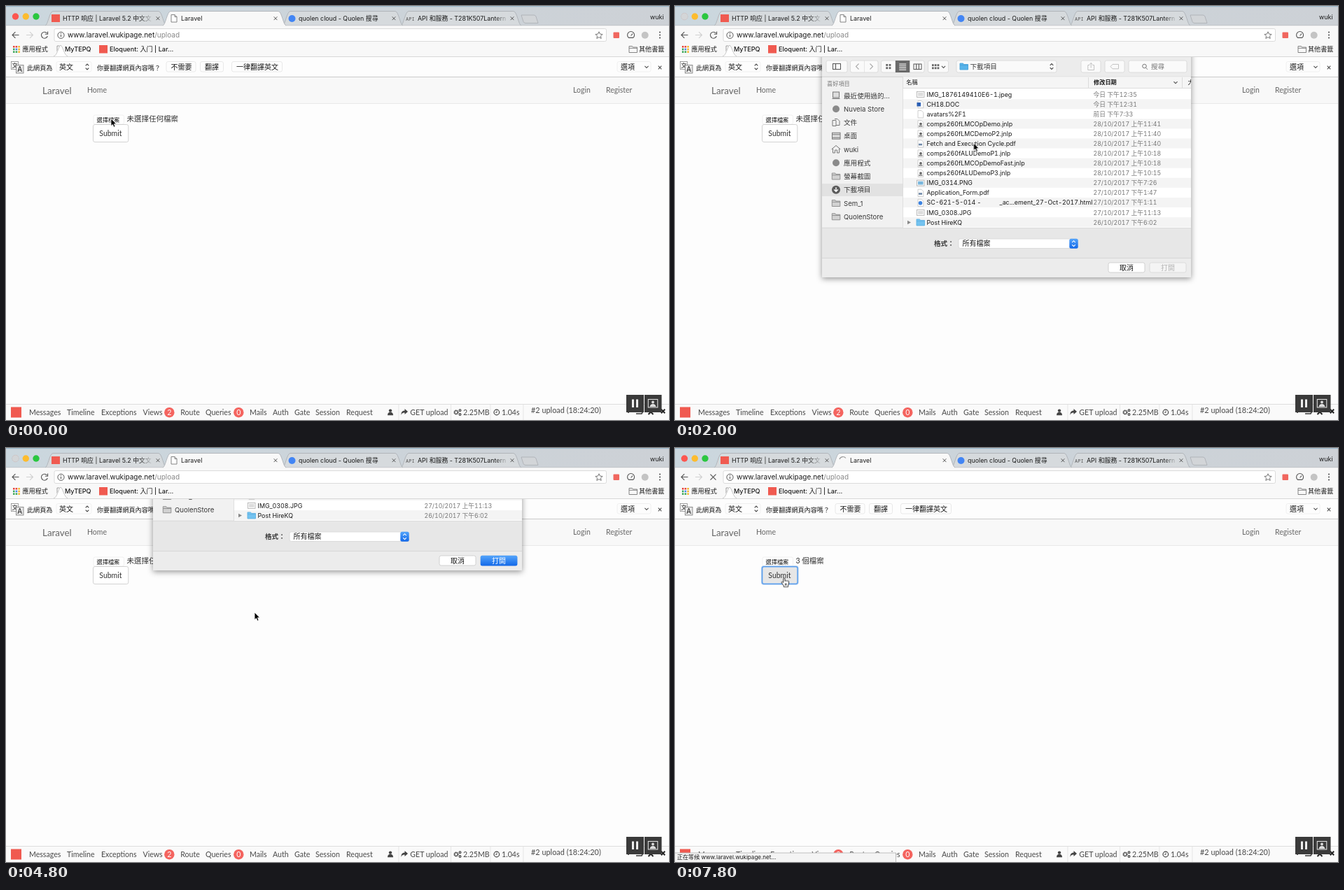
Recreate the animation shown at these times as an HTML page. Size 947x592 px, loop 8000 ms.

```html
<!DOCTYPE html>
<html lang="zh-Hant">
<head>
<meta charset="utf-8">
<title>Upload</title>
<style>
html, body { margin: 0; width: 100%; height: 100%; overflow: hidden; background: #fdfdfd; }
svg { display: block; width: 947px; height: 592px; }
text { font: 8.9px Inter, "Noto Sans CJK TC", "Noto Sans CJK", sans-serif; fill: #1a1a1a; white-space: pre; }
.url { font-size: 10px; }
.ui { font-size: 10px; }
.side { font-size: 9.6px; fill: #383838; }
.small { font-size: 8.2px; }
.status { font-size: 8.05px; }
.mark { font-size: 9.1px; font-weight: 500; }
.semi { font-weight: 500; }
.bold { font-weight: 600; }
.name, .date { font-variant-numeric: tabular-nums; }
.date { font-size: 8.75px; fill: #777; }
.page { font: 10.5px Lato, "Noto Sans CJK TC", "Noto Sans CJK", sans-serif; fill: #666; }
.brand { font-size: 13.4px; }
.bar { font-size: 10.6px; fill: #484848; }
.request { font-size: 10.9px; }
.dark { fill: #333; }
.gray { fill: #777; }
.pale { fill: #b4b4b4; }
.white { fill: #fff; }
.line { fill: none; stroke: #555; stroke-width: 1.1; }

.sheet, .cursor, .t { animation: 8s step-end infinite; }
.sheet { animation-name: sheet; }
.cursor { animation-name: cursor; }
.modal { animation-name: modal; }
.loaded { animation-name: loaded; }
.picked { animation-name: picked; }
.range { animation-name: range; }
.before { animation-name: before; }
.after { animation-name: after; }
.point { animation-name: point; }
.hover { animation-name: hover; }
.focus { animation-name: focus; }
.idle { animation-name: idle; }
.loading { animation-name: loading; }
.waiting { animation-name: waiting; }
.spin { transform-origin: 240px 18px; animation: spin 1.6s steps(8) infinite; }

@keyframes sheet {
  0%, 62.5%, 100% { transform: translateY(-335px); }
  12.5% { transform: translateY(-182px); }
  15%, 57.5% { transform: none; }
  60% { transform: translateY(-213px); }
}
@keyframes cursor {
  0% { transform: translate(150px, 161px); }
  17.5% { transform: translate(150px, 161px); animation-timing-function: steps(3); }
  25% { transform: translate(426.5px, 196px); }
  32.5% { transform: translate(426.5px, 196px); animation-timing-function: steps(2); }
  37.5% { transform: translate(424px, 168px); }
  45% { transform: translate(424px, 168px); animation-timing-function: steps(3); }
  52.5% { transform: translate(689px, 370px); }
  57.5% { transform: translate(600px, 334px); }
  60% { transform: translate(355px, 235px); }
  62.5% { transform: translate(200px, 196px); }
  65% { transform: translate(157px, 185px); }
  85%, 100% { transform: translate(156px, 185.5px); }
}
@keyframes modal { 0%, 62.5%, 100% { opacity: 0; } 12.5% { opacity: 1; } }
@keyframes loaded { 0% { opacity: 0; } 17.5%, 100% { opacity: 1; } }
@keyframes picked { 0% { opacity: 0; } 30%, 100% { opacity: 1; } }
@keyframes range { 0% { opacity: 0; } 37.5%, 100% { opacity: 1; } }
@keyframes before { 0% { opacity: 1; } 62.5%, 100% { opacity: 0; } }
@keyframes after { 0% { opacity: 0; } 62.5%, 100% { opacity: 1; } }
@keyframes point { 0% { opacity: 1; } 65%, 100% { opacity: 0; } }
@keyframes hover { 0% { opacity: 0; } 65%, 100% { opacity: 1; } }
@keyframes focus { 0% { opacity: 0; } 85%, 100% { opacity: 1; } }
@keyframes idle { 0% { opacity: 1; } 90%, 100% { opacity: 0; } }
@keyframes loading { 0% { opacity: 0; } 90%, 100% { opacity: 1; } }
@keyframes waiting { 0% { opacity: 0; } 92.5%, 100% { opacity: 1; } }
@keyframes spin { from { transform: rotate(-45deg); } to { transform: rotate(-405deg); } }
</style>
</head>
<body>
<svg id="stage" viewBox="0 0 947 592"></svg>
<script>
const text = (x, y, s, cls = '') => `<text x="${x}" y="${y}" class="${cls}">${s}</text>`;
const rect = (x, y, w, h, fill, more = '') => `<rect x="${x}" y="${y}" width="${w}" height="${h}" fill="${fill}" ${more}/>`;
const circle = (x, y, r, fill, more = '') => `<circle cx="${x}" cy="${y}" r="${r}" fill="${fill}" ${more}/>`;
const path = (d, more = 'class="line"') => `<path d="${d}" ${more}/>`;
const stroke = (color, width = 1) => `fill="none" stroke="${color}" stroke-width="${width}"`;
const group = (cls, ...parts) => `<g class="${cls}">${parts.join('')}</g>`;
const each = (list, fn) => list.map(fn).join('');
const cross = (x, y, r, more) => path(`M${x - r} ${y - r}l${2 * r} ${2 * r}m0 ${-2 * r}l${-2 * r} ${2 * r}`, more);
const button = (x, y, w, h, fill = '#fff', edge = '#d6d6d6') => rect(x, y, w, h, fill, `rx="2.5" stroke="${edge}" stroke-width=".8"`);
const updown = (x, y, color = '#444') => path(`M${x - 2.3} ${y - 1.6}l2.3-2.4 2.3 2.4m-4.6 3.2l2.3 2.4 2.3-2.4`, stroke(color, 1.1));
const down = (x, y) => path(`M${x - 2.6} ${y - 1.2}l2.6 2.6 2.6-2.6`);
const folder = (x, y, fill, edge) => path(`M${x} ${y}h4.5l1 1.5h6v7.5h-11.5zM${x} ${y + 2.8}h11.5`, `fill="${fill}" stroke="${edge}" stroke-width=".9"`);
const sheetIcon = (x, y) => path(`M${x} ${y}h5l3 3v7.5h-8zM${x + 5} ${y}v3h3`, 'fill="#fff" stroke="#777" stroke-width=".9"');

const RED = '#f05a50';

const tab = (a, b, fill) => path(
  `M${a} 28C${a + 4} 27 ${a + 6} 8 ${a + 11} 7.5H${b - 11}C${b - 6} 8 ${b - 4} 27 ${b} 28`,
  `fill="${fill}" stroke="#a9adb1" stroke-width=".8"`);

function tabStrip() {
  return rect(0, 0, 947, 28, 'url(#strip)') + rect(0, 0, 947, 1.2, '#9db9cb')
    + circle(13.5, 15, 4.7, '#fc5650') + `<circle cx="13.5" cy="15" r="4.9" fill="#d3d5d7" stroke="#c3c5c7" stroke-width=".5" class="t modal"/>`
    + circle(28.3, 15, 4.7, '#fdbc2e') + circle(43, 15, 4.7, '#2ac73f')
    + tab(564, 736, '#d6dadd') + tab(395, 567, '#d6dadd') + tab(56, 229, '#d6dadd')
    + path('M736 13h18q2 0 3 2l3 9.5h-18q-2 0-3-2z', 'fill="#d2d5d8" stroke="#a9adb1" stroke-width=".8"')
    + rect(0, 27.6, 947, .8, '#b4b6b8')
    + tab(224, 400, '#f8f8f8') + rect(225, 27.5, 174, 1.5, '#f8f8f8')
    + rect(65, 12, 12, 11, RED) + text(81, 20.5, 'HTTP 响应 | Laravel 5.2 中文文')
    + rect(190, 10, 20, 14, 'url(#fade)')
    + group('t idle', sheetIcon(236, 12.5))
    + group('t loading', path('M235 16A5.2 5.2 0 0 1 244 14.5', 'class="spin" ' + stroke('#999', 1.2)))
    + text(250, 20.5, 'Laravel')
    + circle(408.5, 18, 5, '#4285f4') + text(418, 20.5, 'quolen cloud - Quolen 搜尋')
    + `<text x="571" y="20.5" style="font:7px 'Noto Sans Mono',monospace;fill:#555">API</text>`
    + text(588, 20.5, 'API 和服務 - T281K507Lantern') + rect(698, 10, 20, 14, 'url(#fade)')
    + each([217, 385, 554, 723], x => cross(x, 17.7, 2.4, stroke('#555', 1)))
    + text(920, 18.5, 'wuki');
}

function toolbar() {
  return rect(0, 28.4, 947, 44, '#f8f8f8') + rect(69, 32.5, 788.5, 18, '#fff', 'rx="2" stroke="#d3d3d3" stroke-width=".8"')
    + path('M18.5 41.5H9m4.4-4.4L9 41.5l4.4 4.4')
    + path('M29 41.5h9.5m-4.4-4.4l4.4 4.4-4.4 4.4', stroke('#d0d0d0', 1.1))
    + group('t idle', path('M58.6 39A4.5 4.5 0 1 0 59.3 43M59.6 36.5v3.7h-3.7'))
    + group('t loading', cross(54.5, 41.7, 4, stroke('#555', 1.2)))
    + circle(78.5, 41.8, 4.6, 'none', 'stroke="#555"') + path('M78.5 41v3.2M78.5 38.8v1.2')
    + `<text x="88" y="45.2" class="url">www.laravel.wukipage.net<tspan fill="#888">/upload</tspan></text>`
    + path('M847 36.8l1.5 3.3 3.6.4-2.7 2.4.8 3.5-3.2-1.8-3.2 1.8.8-3.5-2.7-2.4 3.6-.4z', stroke('#666', .9))
    + rect(867.5, 37.5, 8.5, 8.5, '#f0675f', 'rx="1"')
    + path('M889.4 45.4a5 5 0 1 1 6.4 0zM892.6 42.5l2.4-2.8') + circle(912.7, 41.8, 5, '#c4c4c4')
    + each([37.5, 41.5, 45.5], y => circle(934, y, 1.1, '#555'))
    + each([0, 1, 2, 3, 4, 5, 6, 7, 8], i => rect(10 + i % 3 * 3.7, 57 + (i / 3 | 0) * 3.7, 2.5, 2.5,
        ['#e8453c', '#e8453c', '#f5b52a', '#3aa757', '#4285f4', '#f5b52a', '#3aa757', '#3aa757', '#f5b52a'][i]))
    + text(23.5, 65.2, '應用程式', 'mark')
    + path('M73 65V57h3.5', stroke('#888', .8))
    + path('M68 72.6L78 56 88.5 72.6z', 'fill="#fff"') + path('M68 72C73 71 75 58 78 56M78 56C81 57 83 70 88 72', stroke('#b5b5b5', .8))
    + text(84, 65.2, 'MyTEPQ', 'mark')
    + rect(133, 56, 12, 11.5, RED) + text(148, 65.2, 'Eloquent: 入门 | Lar...', 'mark')
    + folder(890, 57.5, '#f8f8f8', '#777') + text(904, 65.2, '其他書籤', 'mark')
    + rect(0, 72.3, 947, .9, '#c9c9c9');
}

function infoBar() {
  return rect(0, 73, 947, 28.5, '#fdfdfd') + rect(0, 101, 947, 1, '#cacaca')
    + rect(7.5, 79.5, 10, 11, '#fff', 'stroke="#888" stroke-width=".8"') + text(8.4, 88.3, '文', 'small')
    + rect(14.5, 84.5, 10.5, 11.5, '#e8e8e8', 'stroke="#777" stroke-width=".8"') + text(16.3, 94, 'A', 'ui')
    + text(30, 91.7, '此網頁為', 'mark') + button(72, 79.5, 50, 14.5, '#fdfdfd', '#ececec') + text(76, 90.6, '英文', 'ui') + updown(116, 87)
    + text(130, 91.7, '你要翻譯網頁內容嗎？', 'mark')
    + each([[229, 42, '不需要'], [277.5, 33, '翻譯'], [322.5, 72, '一律翻譯英文']], ([x, w, s]) =>
        button(x, 79.5, w, 14.5, '#fdfdfd', '#e4e4e4') + text(x + 6.4, 90.6, s, 'ui'))
    + button(873, 79.5, 48, 14.5, '#fdfdfd', '#ececec') + text(878, 90.6, '選項', 'ui') + down(915, 87)
    + cross(934, 88, 2.3, stroke('#555', 1.2));
}

function page() {
  return rect(0, 102, 947, 37.3, '#f8f8f8') + rect(0, 139, 947, .9, '#e7e7e7')
    + text(52, 125.6, 'Laravel', 'page brand')
    + each([[116, 'Home'], [810, 'Login'], [857, 'Register']], ([x, s]) => text(x, 124.3, s, 'page'))
    + button(125, 156, 43.5, 13, '#fff', '#ececec') + text(129.5, 166, '選擇檔案', 'small semi')
    + group('t before', text(172.5, 164.6, '未選擇任何檔案', 'page dark'))
    + group('t after', text(172.5, 164.6, '3 個檔案', 'page dark'))
    + button(124.5, 169.5, 50.3, 25, '#fff', '#c8c8c8')
    + group('t hover', button(124.5, 169.5, 50.3, 25, '#e6e6e6', '#adadad'))
    + group('t focus', rect(124.3, 169.5, 51, 25, '#e6e6e6', 'rx="2.5" stroke="#b3d0f3" stroke-width="2.6"'),
        rect(124.5, 169.7, 50.6, 24.6, 'none', 'rx="2.5" stroke="#5a9ce8" stroke-width="1.3"'))
    + text(133.3, 185.8, 'Submit', 'page dark');
}

function debugBar() {
  const items = [[33, 'Messages'], [87, 'Timeline'], [136, 'Exceptions'], [195.5, 'Views'], [249.3, 'Route'], [285, 'Queries'],
    [348, 'Mails'], [381, 'Auth'], [412, 'Gate'], [442, 'Session'], [486, 'Request'], [577.3, 'GET upload'], [653, '2.25MB'], [708, '1.04s']];
  return rect(0, 569.5, 947, 22.5, '#fafafa') + rect(0, 569, 947, 1, '#dedede')
    + rect(7, 573.5, 15, 15, RED)
    + each(items, ([x, s]) => text(x, 584.7, s, 'page bar'))
    + each([[233.3, 2], [332.3, 0]], ([x, n]) => circle(x, 581.2, 7.2, '#f4645f') + text(x - 3, 584.8, n, 'page bar white'))
    + circle(549, 578.6, 2.2, '#444') + path('M545 585.3q0-4.5 4-4.5t4 4.5z', 'fill="#444"')
    + path('M564.5 585q-.5-6.5 5-6.5v-2.4l4.5 4-4.5 4v-2.5q-4-.2-5 3.4z', 'fill="#444"')
    + circle(643, 581, 2.5, 'none', 'stroke="#444" stroke-width="2" stroke-dasharray="1.5 .5"')
    + each([578.3, 584], y => circle(648.5, y, 1.4, 'none', 'stroke="#444" stroke-width="1.2"'))
    + circle(700.8, 581, 3.8, 'none', 'stroke="#444" stroke-width="1.2"') + path('M701 578.7v2.7h-1.8', stroke('#444', .9))
    + each([560.5, 635, 691.5, 738.5], x => rect(x, 570, .8, 22, '#e2e2e2'))
    + text(750, 582, '#2 upload (18:24:20)', 'page bar request')
    + path('M886 578h3v4M900 583h8l2-4', stroke('#333', 1.6))
    + path('M917.5 584l3.5-3.5 3.5 3.5', stroke('#222', 2)) + cross(938.5, 579.5, 2.7, stroke('#222', 2))
    + group('t waiting', rect(-1, 579, 316.5, 14, '#f4f4f4', 'stroke="#b8b8b8" stroke-width=".9"'),
        text(3, 588.3, '正在等候 www.laravel.wukipage.net...', 'status'));
}

const playerButtons = () => rect(886, 556, 25, 25, '#3a3a3a') + rect(912, 556, 24.5, 25, '#3a3a3a')
  + rect(894, 562.5, 3, 11.5, '#eee') + rect(900, 562.5, 3, 11.5, '#eee')
  + rect(917.3, 562.5, 13.5, 11.5, 'none', 'stroke="#ddd" stroke-width="1.1"')
  + circle(924, 566.5, 1.9, '#ddd') + path('M919.5 573q1-4 4.5-4t4.5 4z', 'fill="#ddd"');

const places = ['最近使用過的...', 'Nuvela Store', '文件', '桌面', 'wuki', '應用程式', '螢幕截圖', '下載項目', 'Sem_1', 'QuolenStore'];

function placeIcon(i, y) {
  const gray = stroke('#777', 1);
  switch (i) {
    case 0: return rect(225.5, y - 5, 9, 8, '#ddd', 'stroke="#777"') + path(`M224.5 ${y + 4.5}h11`, gray);
    case 1: case 5: return circle(230, y, 5, '#8a8a8a');
    case 2: return path(`M225 ${y - 3}h5v8h-5zM228 ${y - 5}h4l3 3v6h-5`, gray);
    case 3: return rect(224.5, y - 4.5, 11.5, 9, '#ddd', 'stroke="#777"') + path(`M224.5 ${y - 2}h11.5m-11.5 4.5h11.5`, gray);
    case 4: return path(`M223.5 ${y}l6.5-5.5 6.5 5.5M225.5 ${y - 1}v6h3v-4h3v4h3v-6`, gray);
    case 7: return circle(230, y, 6, '#5c5c5c') + path(`M230 ${y - 3.5}v6m-2.8-2.7l2.8 2.8 2.8-2.8`, stroke('#fff', 1.4));
    default: return folder(224.3, y - 4.5, '#d2d2d2', '#888');
  }
}

const files = [
  ['IMG_1876149410E6-1.jpeg', '今日 下午12:35'], ['CH18.DOC', '今日 下午12:31'], ['avatars%2F1', '前日 下午7:33'],
  ['comps260fLMCOpDemo.jnlp', '28/10/2017 上午11:41'], ['comps260fLMCDemoP2.jnlp', '28/10/2017 上午11:40'],
  ['Fetch and Execution Cycle.pdf', '28/10/2017 上午11:40'], ['comps260fALUDemoP1.jnlp', '28/10/2017 上午10:18'],
  ['comps260fLMCOpDemoFast.jnlp', '28/10/2017 上午10:18'], ['comps260fALUDemoP3.jnlp', '28/10/2017 上午10:15'],
  ['IMG_0314.PNG', '27/10/2017 下午7:26'], ['Application_Form.pdf', '27/10/2017 下午1:47'],
  ['SC-621-5-014 -           _ac...ement_27-Oct-2017.html', '27/10/2017 下午1:11'],
  ['IMG_0308.JPG', '27/10/2017 上午11:13'], ['Post HireKQ', '26/10/2017 下午6:02']];

const rowY = i => 126.4 + i * 14.08;

function fileIcon(name, y) {
  if (name.startsWith('Post')) return path(`M332 ${y - 2.7}l5 2.7-5 2.7z`, 'fill="#888"') + folder(345, y - 4.5, '#74c3f0', '#5fb2e2');
  if (name.startsWith('IMG')) return rect(345.5, y - 4, 10.5, 8, '#fff', 'stroke="#aaa" stroke-width=".8"')
    + rect(347, y - 2.4, 7.5, 4.8, name.endsWith('PNG') ? '#79b6dc' : '#dcdcdc');
  const mark = name.endsWith('DOC') ? rect(345.5, y - 2.5, 5.5, 5.5, '#2b5fb4')
    : name.endsWith('html') ? circle(350.5, y + .5, 2.8, '#3b82e0')
    : name.endsWith('jnlp') ? circle(351, y, 1.9, '#666') + rect(348, y + 2.4, 5.5, 1.4, '#777')
    : name.endsWith('pdf') ? rect(348, y, 5, 2.6, '#7089a8') : '';
  return path(`M347 ${y - 5}h5l2.8 2.8v7.5h-7.8z`, 'fill="#fff" stroke="#bbb" stroke-width=".7"') + mark;
}

const fileRow = ([name, date], i, picked = '') => {
  const y = rowY(i);
  return (picked && rect(326, y - 7.3, 411, 13.35, '#0e68d8')) + fileIcon(name, y)
    + text(359.5, y + 3.2, name, 'name ' + picked) + text(597.5, y + 3.2, date, 'date ' + picked);
};

function shareIcons(color) {
  return path('M592 84.5h-2.2v7h8.8v-7h-2.2M594.2 88.5v-7m-2.3 2.2l2.3-2.3 2.3 2.3', stroke(color, .9))
    + path('M622 86.6l3-3.2h8.5v6.4h-8.5z', stroke(color, .9));
}

function sheet() {
  const pick = i => fileRow(files[i], i, 'white semi');
  return rect(210, 60, 527, 328, '#ececec', 'style="filter:drop-shadow(0 2px 4px rgba(0,0,0,.42))"')
    + rect(210, 101, 115.5, 216, '#f1f1f1') + rect(210, 100.8, 527, .8, '#c8c8c8')
    + rect(210, 317, 527, 43, '#e7e7e7') + rect(210, 316.8, 527, .7, '#d0d0d0') + rect(210, 360, 527, .8, '#d2d2d2')
    // window tools
    + each([[216, 30], [250.5, 39.5], [294.5, 61.5], [361.5, 29], [402, 143], [580, 28], [614, 28], [648, 83]], ([x, w]) => button(x, 78, w, 17, '#fafafa'))
    + rect(225.5, 82.5, 11, 8, 'none', 'stroke="#555"') + path('M229.5 82.5v8')
    + path('M262.5 82.5l-4 4 4 4M278.5 82.5l4 4-4 4', stroke('#aaa', 1.1)) + rect(270, 78, .7, 17, '#ddd')
    + rect(314.8, 78, 20.5, 17, '#696969')
    + each([0, 1, 2, 3], i => rect(301.3 + i % 2 * 4.3, 83 + (i >> 1) * 4.3, 2.8, 2.8, '#666'))
    + each([82.5, 85.2, 87.9, 90.6], y => rect(320.2, y, 10, 1.1, '#fff'))
    + rect(341, 83, 11, 7.5, 'none', 'stroke="#555"') + path('M344.7 83v7.5m3.7-7.5v7.5')
    + each([0, 1, 2, 3, 4, 5], i => rect(367 + i % 3 * 3.8, 83.2 + (i / 3 | 0) * 4.2, 2.7, 2.8, '#666')) + down(383.5, 87)
    + folder(407, 82, '#58b4ea', '#48a2da') + text(421.5, 90.2, '下載項目', 'side') + updown(538, 86.5)
    + shareIcons('#bbb') + group('t picked', shareIcons('#666'))
    + circle(670.5, 86, 2.8, 'none', 'stroke="#777"') + path('M672.5 88.2l2.5 2.6', stroke('#777', 1)) + text(680, 90.2, '搜尋', 'side gray')
    // sidebar
    + text(217, 114, '喜好項目', 'small gray')
    + rect(210, 254, 115.5, 17.5, '#d0d0d0') + group('t loaded', rect(210, 254, 115.5, 17.5, '#e2e2e2'))
    + each(places, (s, i) => placeIcon(i, 128 + i * 19.25) + text(241, 131.7 + i * 19.25, s, 'side'))
    // file list
    + rect(325.5, 101.5, 411.5, 215.5, '#fff') + rect(325.2, 101.5, .7, 215.5, '#d5d5d5')
    + each([1, 3, 5, 7, 9, 11, 13], i => rect(326, rowY(i) - 7.3, 411, 14.08, '#f4f4f4'))
    + rect(326, 101.6, 411, 15.6, '#f5f5f5') + rect(326, 117, 411, .7, '#d0d0d0')
    + text(330.3, 112, '名稱', 'small') + text(598, 112, '修改日期', 'small bold') + down(715, 109.3)
    + rect(590, 102, .7, 15, '#d0d0d0') + rect(724, 102, .7, 15, '#d0d0d0')
    + `<g clip-path="url(#edge)">${text(732.5, 112, '大', 'small')}</g>`
    + group('t loaded', ...files.map((f, i) => fileRow(f, i)))
    + group('t range', pick(3), pick(4)) + group('t picked', pick(5))
    // footer
    + text(370, 343.2, '格式：', 'side bold') + button(405, 333, 170.5, 13.5) + text(410.5, 343.4, '所有檔案', 'ui') + updown(569.5, 339.7)
    + group('t loaded', rect(563.3, 332.7, 12.4, 14, 'url(#blue)', 'rx="2.5"'), updown(569.5, 339.7, '#fff'))
    + button(619, 367, 52, 14, '#fff', '#c8c8c8') + text(635, 377.5, '取消', 'ui')
    + button(678, 367, 52, 14, '#f4f4f4', '#d6d6d6') + text(694, 377.5, '打開', 'ui pale')
    + group('t picked', rect(677.7, 366.7, 52.7, 14.8, 'url(#blue)', 'rx="2.5"'), text(694, 377.5, '打開', 'ui white'));
}

const pointer = () => group('cursor',
  group('t point', path('M0 0V10.6L2.4 8.4 4.1 12.2 6 11.4 4.4 7.7H7.6Z', 'stroke="#fff" stroke-width=".8"')),
  group('t hover', path('M0 .5C-.8.5-1.2 1.1-1.2 1.8V7L-2.6 6c-.9-.4-1.8.4-1.2 1.2L-.8 11.3V13H5.6V11.3L6.6 8V5.4c0-1-1.6-1-1.8-.2c-.2-1-1.7-1-1.9-.2c-.2-.8-1.6-.8-1.8 0V1.8C1.1 1 .7.5 0 .5ZM1.5 8v3M3.2 8v3',
    'fill="#fff" stroke="#222" stroke-width=".9"')));

document.getElementById('stage').innerHTML = `
  <defs>
    <linearGradient id="strip"><stop stop-color="#cbd7de"/><stop offset="1" stop-color="#cdd1d6"/></linearGradient>
    <linearGradient id="fade"><stop stop-color="#d6dadd" stop-opacity="0"/><stop offset="1" stop-color="#d6dadd"/></linearGradient>
    <linearGradient id="blue" x2="0" y2="1"><stop stop-color="#55a5fb"/><stop offset="1" stop-color="#1268e8"/></linearGradient>
    <clipPath id="below"><path d="M0 73H947V592H0z"/></clipPath>
    <clipPath id="edge"><path d="M725 100h12v20h-12z"/></clipPath>
  </defs>
  ${rect(0, 0, 947, 592, '#fdfdfd')}
  ${tabStrip()}${toolbar()}${infoBar()}${page()}${debugBar()}
  <g clip-path="url(#below)">${group('sheet', sheet())}</g>
  ${playerButtons()}${pointer()}`;
</script>
</body>
</html>
```
